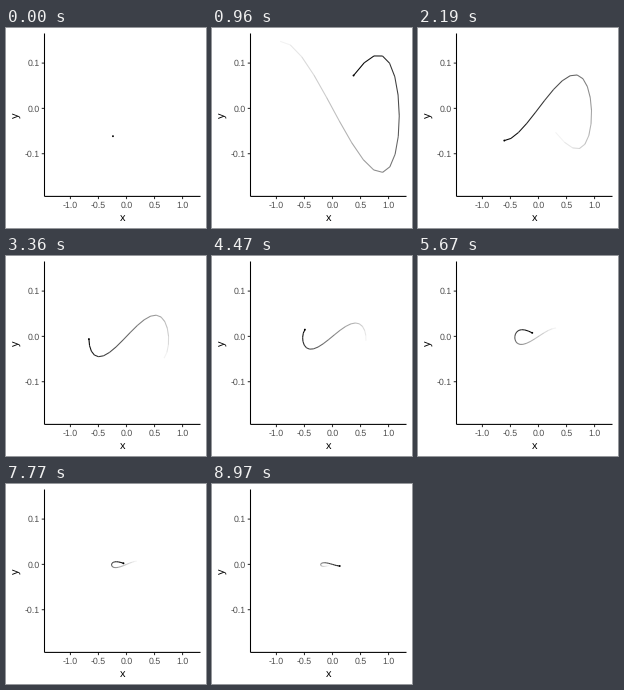
These frames come from a looping animation (200 by 200 pixels, 9 s). A matplotlib script:

```python
import numpy as np
import matplotlib.pyplot as plt
from matplotlib.animation import FuncAnimation
from matplotlib.collections import LineCollection
from matplotlib.patches import Circle

SIZE, DPI = 200, 100
PT = 72 / DPI  # points per pixel
FRAMES, INTERVAL = 300, 30
TRAIL = 20

LEFT, RIGHT, TOP, BOTTOM = 38.5, 194.5, 5.5, 168.4
X0, Y0 = 120.5, 80.4
SX, SY = 56.06, 453

plt.rcParams["font.family"] = "Liberation Sans"
plt.rcParams["text.hinting"] = "none"
fig = plt.figure(figsize=(SIZE / DPI, SIZE / DPI), dpi=DPI, facecolor="white")
ax = fig.add_axes([0, 0, 1, 1])
ax.set(xlim=(0, SIZE), ylim=(SIZE, 0))
ax.axis("off")


def line(xs, ys, color="black"):
    ax.plot(xs, ys, color=color, lw=1.07 * PT, solid_capstyle="butt", snap=False)


def label(x, y, text, size, color="black", **kw):
    ax.text(x, y, text, fontsize=size * PT, color=color, va="baseline", **kw)


def orbit(n):
    """Damped figure eight, in pixels."""
    theta = np.pi * (n / 17.41 - 0.945)
    decay = np.exp(-0.0066 * n)
    s, c = np.sin(theta), np.cos(theta)
    x = 1.405 * decay * s
    y = -decay**2 * s * (0.36 * c + 0.0125 * s)
    return np.column_stack([X0 + SX * x, Y0 - SY * y])


# Axes
for v in (-1.0, -0.5, 0.0, 0.5, 1.0):
    px = X0 + SX * v
    line([px, px], [BOTTOM, BOTTOM + 2.75], "#333333")
    label(px, 179.7, f"{v:.1f}", 8.8, "#4d4d4d", ha="center")
for v in (-0.1, 0.0, 0.1):
    py = Y0 - SY * v
    line([LEFT - 2.75, LEFT], [py, py], "#333333")
    label(33.6, py + 3.15, f"{v:.1f}", 8.8, "#4d4d4d", ha="right")
line([LEFT, LEFT], [TOP, BOTTOM])
line([LEFT, RIGHT], [BOTTOM, BOTTOM])
label((LEFT + RIGHT) / 2, 192.6, "x", 11, ha="center")
label(13.9, (TOP + BOTTOM) / 2, "y", 11, ha="center",
      rotation=90, rotation_mode="anchor")

# Moving parts
path = orbit(np.arange(FRAMES))
trail = LineCollection([], linewidths=1.07 * PT, capstyle="butt", zorder=3)
ax.add_collection(trail, autolim=False)
dot = ax.add_patch(Circle(path[0], 0.95, fc="black", lw=0, zorder=4))


def update(n):
    first = max(0, n - TRAIL)
    pts = path[first:n + 1]
    trail.set_segments(np.stack([pts[:-1], pts[1:]], axis=1))
    ages = n - 1 - np.arange(first, n)
    trail.set_color([(0, 0, 0, 1 - a / TRAIL) for a in ages])
    dot.center = path[n]
    return trail, dot


anim = FuncAnimation(fig, update, frames=FRAMES, interval=INTERVAL,
                     repeat=True, repeat_delay=0, blit=False)
plt.show()
```
